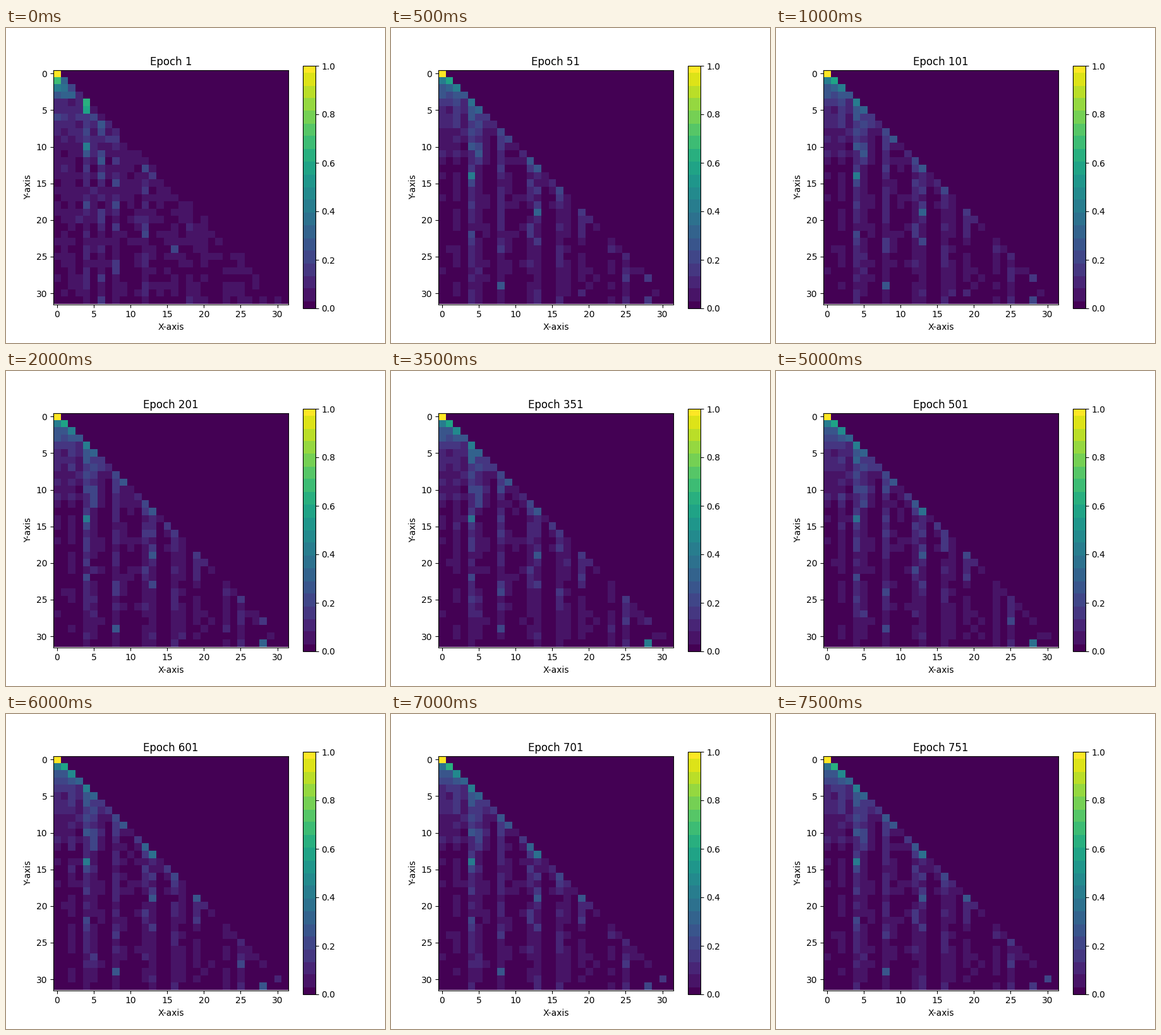
A matplotlib script that plays this animation: 600 px wide and 500 px high, repeating every 8000 ms.

```python
import numpy as np
import matplotlib.pyplot as plt
from matplotlib.animation import FuncAnimation
from matplotlib.colors import ListedColormap

SIZE = 32
FRAMES = 16
BANDS = 19

# Columns that draw (or repel) attention, as logits
RAW_PULL = {4: 1.1, 6: .8, 8: 1, 12: .9, 16: .6, 18: .5, 20: .4, 25: .7}
PULL = {1: -.5, 2: .3, 3: -.6, 4: 1.6, 5: 1, 7: -1, 8: 1.5, 12: 1, 13: 1.3,
        14: -.6, 16: 1.2, 17: 1, 18: -.7, 19: 1.4, 22: -.5, 23: 1.2, 24: -.7,
        25: 1.4}
# Extra attention of a position to itself: early, late
SELF = {3: (.3, .6), 9: (1.4, 1.7), 11: (.6, 1.2), 13: (1, 1.4),
        15: (1.5, 1.6), 19: (.6, 1.4), 28: (2.5, 1.2), 30: (-1, 2.8)}

rng = np.random.default_rng(11)
raw_noise, noise = rng.normal(0, .5, (2, SIZE, SIZE))
phase = rng.uniform(0, 2 * np.pi, (SIZE, SIZE))
idx = np.arange(SIZE)
ramp = np.minimum(1, idx / 12)[:, None]  # early rows stay nearly uniform


def lerp(a, b, t):
    return a + (b - a) * t


def spread(points):
    line = np.zeros(SIZE)
    line[list(points)] = list(points.values())
    return line


def causal_softmax(logits):
    w = np.tril(np.exp(logits))
    return w / w.sum(axis=1, keepdims=True)


def raw_map():
    logits = ramp * (spread(RAW_PULL) + raw_noise)
    logits[idx, idx] -= .8
    logits[4:6, 4] += 2.1, 1.4
    return causal_softmax(logits)


def settled_map(t):
    wobble = .15 * np.sin(phase + 2 * np.pi * t)
    logits = ramp * (spread(PULL) + noise + wobble)
    focus = np.full(SIZE, lerp(.3, .5, t))
    for i, (early, late) in SELF.items():
        focus[i] = lerp(early, late, t)
    logits[idx, idx] += focus
    logits[14, 4] += .8
    logits[31, 28] = 2.4 + 1.4 * np.sin(np.pi * t)
    return causal_softmax(logits)


def attention(i):
    return raw_map() if i == 0 else settled_map((i - 1) / (FRAMES - 2))


steps = np.round(np.linspace(0, 1, 256) * BANDS) / BANDS
cmap = ListedColormap(plt.get_cmap("viridis")(steps))

fig, ax = plt.subplots(figsize=(6, 5), dpi=100)
image = ax.imshow(attention(0), cmap=cmap, vmin=0, vmax=1)
fig.colorbar(image, ax=ax)
ax.set_xlabel("X-axis")
ax.set_ylabel("Y-axis")
title = ax.set_title("Epoch 1", pad=5.3)


def update(i):
    image.set_data(attention(i))
    title.set_text(f"Epoch {50 * i + 1}")
    return image, title


anim = FuncAnimation(fig, update, frames=FRAMES, interval=500,
                     repeat=True, repeat_delay=0, blit=False)
plt.show()
```
